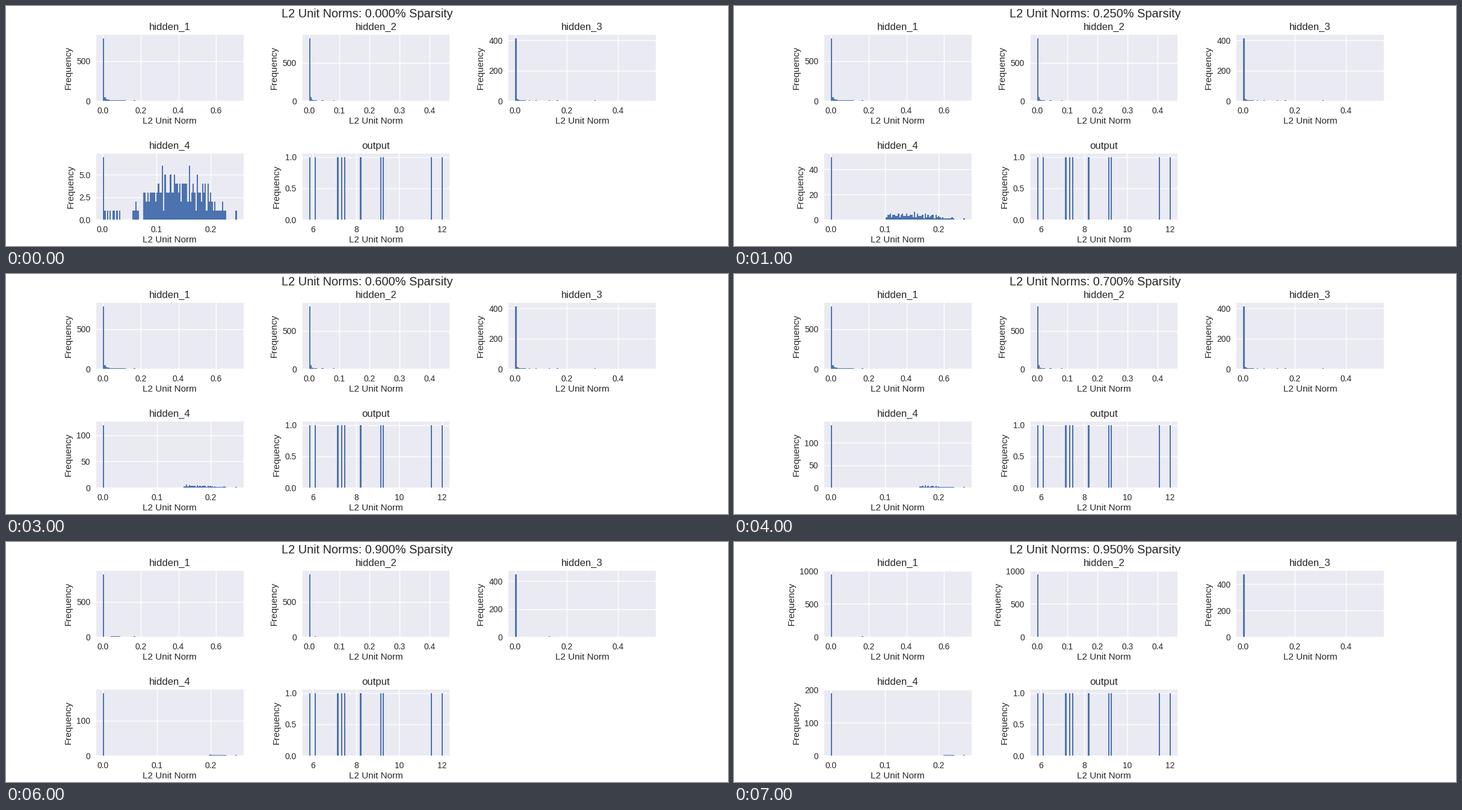
Animation of 1200 by 400 pixels, one loop 8000 ms. Source, as a matplotlib script:

```python
import numpy as np
import matplotlib.pyplot as plt
from matplotlib.animation import FuncAnimation
from matplotlib.ticker import MaxNLocator, MultipleLocator

INK = "0.15"
BLUE = "#4C72B0"
BINS = 100
SPARSITY = [0, 0.25, 0.5, 0.6, 0.7, 0.8, 0.9, 0.95]

plt.rcParams.update({
    "font.family": "Liberation Sans", "font.size": 12, "text.color": INK,
    "axes.facecolor": "#EAEAF2", "axes.labelcolor": INK,
    "axes.labelsize": 11, "axes.titlesize": 12, "axes.axisbelow": True,
    "axes.ymargin": 0.0527,
    "axes.grid": True, "grid.color": "white", "grid.linewidth": 1,
    "xtick.color": INK, "ytick.color": INK,
    "xtick.labelsize": 10, "ytick.labelsize": 10,
    "xtick.major.size": 0, "ytick.major.size": 0,
    "xtick.major.pad": 7, "ytick.major.pad": 7,
})
for side in ("left", "right", "top", "bottom"):
    plt.rcParams[f"axes.spines.{side}"] = False


def norms(pos, lo, hi):
    """Turn bin positions (0 to BINS) into sorted norms spanning lo to hi."""
    pos = np.sort(np.array(pos, float))
    pos[0], pos[-1] = 0, BINS
    return lo + (hi - lo) * pos / BINS


def long_tail(total, peak, scale, power, head, spikes, hi):
    """A tall first bin, a power-law head, some spikes, then single units."""
    bins = [0] * peak + spikes
    for b in range(1, head + 1):
        bins += [b] * round(scale / b ** power)
    rest = total - len(bins)
    bins += range(head + 1, head + 1 + rest)
    return norms(np.array(bins) + 0.5, 0, hi)


def bell(total, lo, hi):
    """Rank-to-bin curve through a few points, roughened along the hump."""
    rng = np.random.default_rng(4)
    rank = np.arange(total, dtype=float)
    rank[20:190] += rng.uniform(-2, 2, 170)
    knots = [(0, 0), (6, 0.9), (7, 1.5), (13, 12.5), (14, 22.5), (19, 26.5),
             (20, 30), (50, 41), (100, 55), (140, 66), (180, 79), (190, 83.5),
             (192, 86.9), (198, 91.5), (199, 100)]
    return norms(np.interp(rank, *zip(*knots)), lo, hi)


# name, norms, x tick step, whether units get pruned
LAYERS = [
    ("hidden_1", long_tail(1000, 787, 45, 0.9, 16, [23] * 4, 0.7095), 0.2, True),
    ("hidden_2", long_tail(1000, 825, 50, 1.5, 5, [9, 10, 18] * 3, 0.4434),
     0.1, True),
    ("hidden_3", long_tail(500, 415, 12, 0.9, 7,
                           [10, 25, 59, 75] * 2 + [15, 31], 0.5205), 0.2, True),
    ("hidden_4", bell(200, 0.001, 0.2485), 0.1, True),
    ("output", norms([0, 4.5, 21.5, 24.5, 26.5, 38.5, 53.5, 55.5, 91.5, 100],
                     5.812, 12.047), 2, False),
]

fig = plt.figure(figsize=(12, 4), dpi=100, facecolor="white")
fig.subplots_adjust(left=0.125, right=0.9, bottom=0.11, top=0.88,
                    wspace=0.4, hspace=0.8)
axes = [fig.add_subplot(2, 3, i + 1) for i in range(len(LAYERS))]
heading = fig.text(0.5, 1 - 19 / 400, "", size=14.4, ha="center", va="baseline")


def draw(i):
    k = SPARSITY[i]
    heading.set_text(f"L2 Unit Norms: {k:.3f}% Sparsity")
    for ax, (name, values, step, prunable) in zip(axes, LAYERS):
        shown = values.copy()
        if prunable:
            shown[:round(k * len(shown))] = 0
        ax.clear()
        ax.hist(shown, BINS, color=BLUE)
        ax.xaxis.set_major_locator(MultipleLocator(step))
        ax.yaxis.set_major_locator(MaxNLocator(3, steps=[1, 2, 2.5, 5, 10]))
        ax.set_title(name)
        ax.set_xlabel("L2 Unit Norm", labelpad=2.6)
        ax.set_ylabel("Frequency", labelpad=4.7)


anim = FuncAnimation(fig, draw, frames=len(SPARSITY), interval=1000,
                     repeat=True, repeat_delay=0)
plt.show()
```
